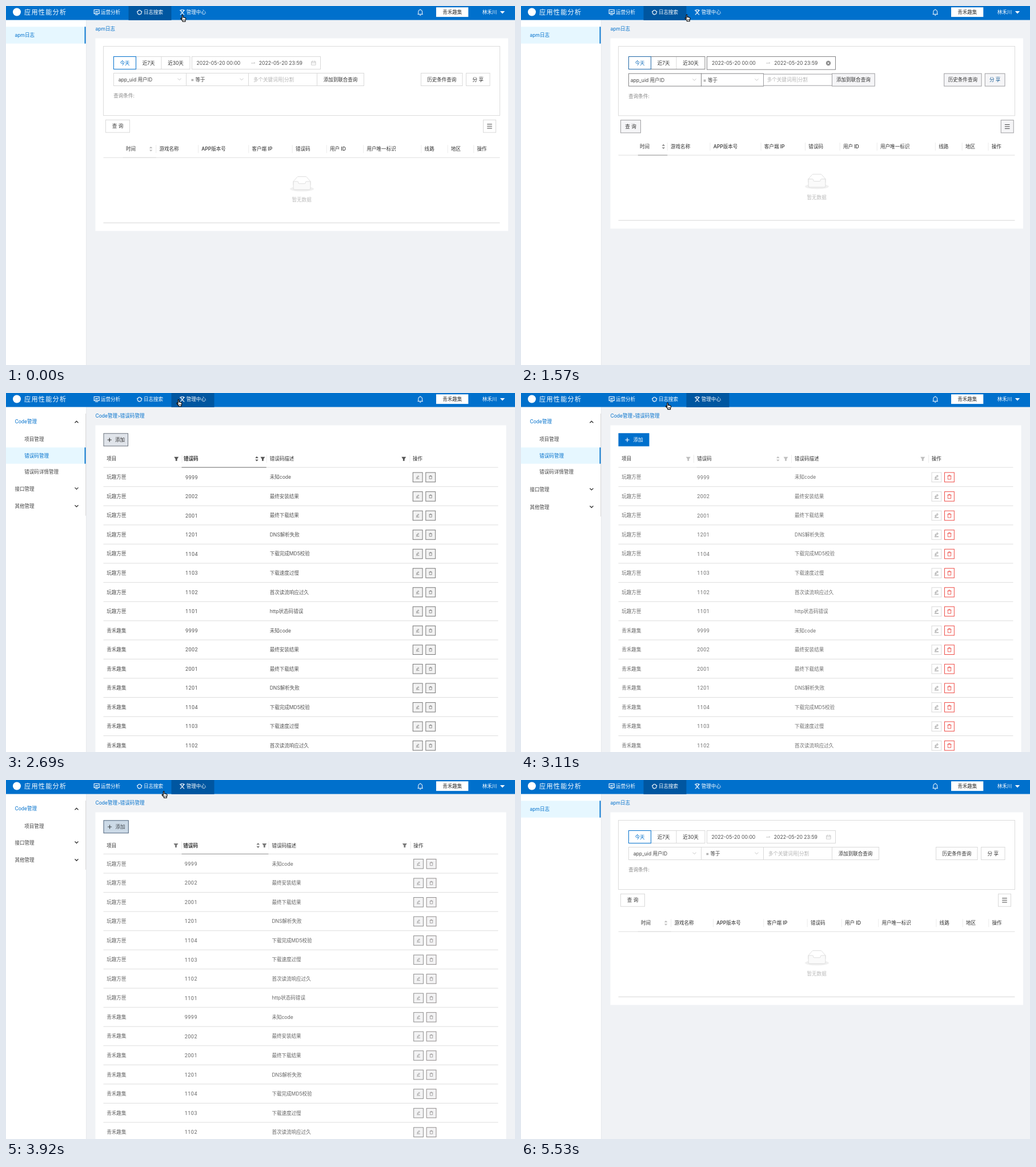
Write an HTML page with a canvas that moves like this. It is 891 px wide and 628 px high and loops after 7060 ms.

```html
<!DOCTYPE html>
<html lang="zh-CN">
<head>
<meta charset="utf-8">
<title>应用性能分析</title>
<style>
html, body { margin: 0; width: 100%; height: 100%; overflow: hidden; background: #f0f2f5; }
canvas { display: block; width: 100vw; height: 100vh; }
</style>
</head>
<body>
<canvas id="stage"></canvas>
<script>
const W = 891, H = 628, LOOP = 7060;
const BLUE = '#0070cc', INK = '#333333', GREY = '#d9d9d9', WHITE = '#ffffff';
const CJK = '"Noto Sans CJK SC", "Noto Sans CJK", sans-serif';
const canvas = document.getElementById('stage');
const ctx = canvas.getContext('2d');
const dpr = window.devicePixelRatio || 1;
canvas.width = W * dpr;
canvas.height = H * dpr;

// Page switches: [time, page]
const SWITCHES = [
  [0, 'log'], [890, 'admin'], [1420, 'log'], [1980, 'admin'], [2330, 'log'],
  [2655, 'admin'], [3460, 'log'], [3820, 'admin'], [4185, 'log']
];

// Pointer path: [time, x, y]
const PATH = [
  [0, 305, 15], [360, 305, 15], [470, 310, 15], [890, 310, 15], [1170, 247, 14],
  [1380, 249, 15], [1720, 312, 14], [2040, 315, 12], [2220, 258, 16], [2340, 256, 16],
  [2560, 306, 12], [2690, 298, 11], [2900, 250, 15], [3240, 254, 17], [3520, 313, 15],
  [3700, 314, 16], [4030, 258, 20], [4220, 264, 19], [4400, 480, 180], [4600, 685, 351],
  [4900, 775, 505], [5310, 831, 610], [5530, 836, 630]
];

const APP = '青禾趣集', BOX = '玩趣方匣', USER = '林禾川';
const ERRORS = [
  ['9999', '未知code'], ['2002', '最终安装结果'], ['2001', '最终下载结果'], ['1201', 'DNS解析失败'],
  ['1104', '下载完成MD5校验'], ['1103', '下载速度过慢'], ['1102', '首次读流响应过久'], ['1101', 'http状态码错误']
];

let age = 9999; // ms since the current page appeared

const lerp = (a, b, q) => a + (b - a) * q;
const clamp = q => Math.max(0, Math.min(1, q));
const inOut = q => q < .5 ? 4 * q ** 3 : 1 - (2 - 2 * q) ** 3 / 2;
const settle = (a, b, mix = lerp) => mix(a, b, inOut(clamp((age - 60) / 210)));

// Settling styles: hold the first, pass the second, ease to the last
function pose(a, b, c, mix = lerp) {
  return age < 60 ? mix(a, b, clamp((age - 40) / 20)) : settle(b, c, mix);
}

function mixColor(a, b, q) {
  const part = (s, i) => parseInt(s.slice(i, i + 2), 16);
  return `rgb(${[1, 3, 5].map(i => Math.round(lerp(part(a, i), part(b, i), q)))})`;
}
const tone = (a, b, c) => pose(a, b, c, mixColor);

function text(s, x, y, color = INK, { size = 8.54, weight = 400, align = 'left', gap = 0, latin = 'Inter' } = {}) {
  ctx.font = `${weight} ${size}px ${latin}, ${CJK}`;
  ctx.letterSpacing = gap + 'px';
  ctx.textAlign = align;
  ctx.fillStyle = color;
  ctx.fillText(s, x, y + size * .37);
}

function fill(x, y, w, h, color) {
  ctx.fillStyle = color;
  ctx.fillRect(x, y, w, h);
}

function frame(x0, y0, x1, y1, border, back) {
  if (back) fill(x0, y0, x1 - x0, y1 - y0, back);
  ctx.strokeStyle = border;
  ctx.lineWidth = 1;
  ctx.strokeRect(x0, y0, x1 - x0, y1 - y0);
}

function shape(d, x, y, { stroke, fill: back, width = 1, scale = 1 }) {
  ctx.save();
  ctx.translate(x, y);
  ctx.scale(scale, scale);
  const p = new Path2D(d);
  if (back) { ctx.fillStyle = back; ctx.fill(p); }
  if (stroke) { ctx.strokeStyle = stroke; ctx.lineWidth = width; ctx.stroke(p); }
  ctx.restore();
}

function disc(x, y, r, color) {
  ctx.fillStyle = color;
  ctx.beginPath();
  ctx.arc(x, y, r, 0, 7);
  ctx.fill();
}

const chevron = (x, y, up, color, width = 1.3) =>
  shape(up ? 'M-3 1.7L0-1.3L3 1.7' : 'M-3-1.7L0 1.3L3-1.7', x, y, { stroke: color, width });

function sorter(x, y, color) {
  shape('M-2.8-1.2L0-4.4L2.8-1.2ZM-2.8 1.2L0 4.4L2.8 1.2Z', x, y, { fill: color });
}

function funnel(x, y, color) {
  shape('M-4-3.5H4L1.4 .3V3.6H-1.4V.3Z', x, y, { fill: color });
}

function header(page) {
  fill(0, 0, W, 24.5, BLUE);
  fill(page === 'log' ? 214.5 : 289.5, 0, 75, 24.8, '#0056a0');
  disc(19, 10.5, 7, WHITE);
  text('应用性能分析', 32, 10.5, WHITE, { size: 11.2, weight: 500, gap: 1.2 });

  const line = { stroke: WHITE, width: 1.1 };
  shape('M-4.5-4.2H4.5V2.7H-4.5ZM-2.5 4.6H2.5M-2.7 .7L-.8-1.4L.6 .2L2.8-2.2', 158.7, 10.7, line);
  text('运营分析', 166, 11, WHITE);
  shape('M-3.4-1.4A3.7 3.7 0 0 1 3.4-1.4M3.6 1A3.7 3.7 0 0 1 1 3.6M-1 3.6A3.7 3.7 0 0 1-3.6 1', 233.7, 11, line);
  shape('M-5-1.6L-1.8-1.2L-3.8 .9ZM5-1.6L1.8-1.2L3.8 .9ZM-1.2 2.4L1.4 3.8L-1 5Z', 233.7, 11, { fill: WHITE });
  text('日志搜索', 241, 11, WHITE);
  shape('M-2-4H2V-.5H-2ZM0-.5V1.5M-3.6 4.5L0 1L3.6 4.5M-4.5-3.2H-2M2-3.2H4.5', 308.5, 10.8, line);
  text('管理中心', 315.8, 11, WHITE);

  shape('M-4.6 3.4H4.6M-3.4 3.4V-1A3.4 3.4 0 0 1 3.4-1V3.4M0-4.4V-5.6M-1.3 5.2H1.3', 725.2, 11, { stroke: WHITE, width: 1 });
  fill(753, 2.3, 56.3, 16.8, WHITE);
  text(APP, 781.2, 10.8, INK, { align: 'center' });
  text(USER, 833.7, 10.8, WHITE);
  shape('M-4.2-2.2H4.2L0 2.2Z', 869, 11.2, { fill: WHITE });
}

function activeItem(y0, y1) {
  fill(0, y0, 139.5, y1 - y0, '#e6f7ff');
  fill(137.6, y0, 1.9, y1 - y0, BLUE);
}

function emptyState(dy) {
  const x = 497.2, y = 298.5 + dy, scale = .65;
  shape('M0 33A32 7 0 1 0 64 33A32 7 0 1 0 0 33Z', x, y, { fill: '#f0f0f0', scale });
  shape('M55 12.8L44.9 1.3Q44 0 42.9 0H21.1Q20 0 19.1 1.3L9 12.8V22H55Z', x, y,
    { fill: WHITE, stroke: GREY, width: 1.3, scale });
  shape('M41.6 15.9Q41.8 13 43.8 13H55V31Q55 35 52 35H12Q9 35 9 31V13H20.2Q22.4 13 22.4 16Q22.4 18.9 24.6 18.9H39.4Q41.6 18.9 41.6 15.9Z',
    x, y, { fill: '#fafafa', stroke: GREY, width: 1.3, scale });
  text('暂无数据', 517.6, 339 + dy, '#bbbbbb', { align: 'center' });
}

function logFilters(border, edge, back) {
  const drop = pose(1.5, 1, 0), top = 117.5 + drop, low = 139.5 + drop, mid = 128.4 + drop;
  frame(170.5, 70.5, 864.5, 191.5 + drop / 2, '#dcdcdc', WHITE);

  frame(188.5, 88.5, 322, 110.5, border, WHITE);
  fill(271.5, 89, 1, 21, GREY);
  frame(188.5, 88.5, 227.5, 110.5, tone('#444444', '#2f6293', BLUE));
  text('今天', 208, 99.7, tone('#444444', '#2472b5', BLUE), { align: 'center' });
  text('近7天', 249.6, 99.7, INK, { align: 'center' });
  text('近30天', 297, 99.7, INK, { align: 'center' });

  const shift = pose(1, .7, 0), dates = { size: 8.65 };
  frame(325.5, 88.5, 550.5, 110.5 + drop, border, WHITE);
  text('2022-05-20 00:00', 333.5 + shift, 99.8 + drop * .3, '#505050', dates);
  text('2022-05-20 23:59', 442.8 + shift, 99.8 + drop * .3, '#505050', dates);
  shape('M-3.5 0H3.5L1.5-1.6', 432.5, 100, { stroke: '#bfbfbf', width: .9 });
  if (age < 180) {
    disc(538, 100, 4.2, tone('#444444', '#777777', '#bbbbbb'));
    shape('M-1.5-1.5L1.5 1.5M1.5-1.5L-1.5 1.5', 538, 100, { stroke: WHITE, width: 1 });
  } else {
    shape('M-3.7-2.8H3.7V3.4H-3.7ZM-3.7-.4H3.7M-1.8-4V-1.8M1.8-4V-1.8', 538.3, 99.8, { stroke: '#bfbfbf', width: .8 });
  }

  frame(188.5, top, 315.5, low, border, WHITE);
  frame(315.5, top, 424.5, low, border, WHITE);
  const field = age < 50 ? 'a' : age < 150 ? 'app_uid⋯' : 'app_uid 用户ID';
  text(field, pose(189, 189.3, 196.7), mid + .3, '#444444');
  text(age < 50 ? '=' : '= 等于', pose(316.3, 316.6, 323.5), mid + .3, '#444444');
  chevron(303.5, mid, false, '#bfbfbf', .9);
  chevron(412.5, mid, false, '#bfbfbf', .9);
  const inset = pose(2, 1.5, 0);
  frame(424.5, top + inset, 544.5, low - inset, edge, WHITE);
  text('多个关键词用|分割', pose(428, 429.7, 433), mid, '#b5b5b5');

  const button = (s, x0, x1, color = INK) => {
    frame(x0, top, x1, low, edge, back);
    text(s, (x0 + x1) / 2, mid, color, { align: 'center' });
  };
  button('添加到联合查询', 544.5, pose(615, 615.7, 626.5));
  button('历史条件查询', pose(748.5, 747.5, 726.5), pose(810.5, 809.5, 799));
  button('分 享', pose(816.5, 815.5, 805.5), 847, tone('#1174c7', '#1174c7', INK));
  text('查询条件:', 188.3, 157 + drop * .8, '#888888');
}

function logTable(edge, back) {
  const step = pose(1, 1, 0), dy = pose(-5.6, -6.3, 0);
  const y0 = 199.3 + step * .5, y1 = 221.2 + step;
  const right = pose(205.5, 206, 216.5);
  frame(174.5, y0, right, y1, edge, back);
  text('查 询', (174.5 + right) / 2, 210 + step, INK, { align: 'center' });

  const x = pose(842.5, 842.5, 835.5);
  frame(x, y0, x + 22, y1, edge, back);
  shape('M-4.3-3.5H4.3M-4.3 0H4.3M-4.3 3.5H4.3', x + 11, 210.3 + step, { stroke: '#444444', width: 1 });

  const y = 250.2 + dy;
  const heads = ['时间', '游戏名称', 'APP版本号', '客户端 IP', '错误码', '用户 ID', '用户唯一标识', '线路', '地区', '操作'];
  const from = [205.3, 254, 329.8, 420, 498.8, 560, 626, 729.3, 776.5, 823];
  const to = [210, 268.5, 342.3, 430.5, 507, 567, 631.5, 732.6, 779, 824.5];
  const cols = to.map((c, i) => pose(from[i], lerp(from[i], c, .34), c));
  heads.forEach((s, i) => {
    text(s, cols[i], y, INK, { weight: 500 });
    if (i) fill(cols[i] - 6.3, y - 7, 1, 14, '#ebebeb');
  });
  sorter(pose(243.3, 247.3, 253.6), y, tone('#444444', '#777777', '#bfbfbf'));
  fill(170.5, y + 14.5, 694, 1, '#dedede');
  fill(204.8, y + 14.5, cols[1] - 210.5, 1, tone('#555555', '#777777', '#dedede'));
  emptyState(dy);
  fill(170.5, 378.8 + dy, 694, 1, '#d6d6d6');
}

function logPage() {
  const border = tone('#444444', '#5c5c60', GREY);
  const edge = tone('#777777', '#808084', GREY);
  const back = tone('#efefef', '#f0f0f3', WHITE);
  activeItem(36.3, 65.7);
  text('apm日志', 15.5, 51, BLUE);
  text('apm日志', 156.5, 40, BLUE);
  fill(156.5, 56.5, 722.5, 337 + pose(-5.5, -6, 0), WHITE);
  logFilters(border, edge, back);
  logTable(edge, back);
}

function adminMenu() {
  // The submenu shows whole, then folds and opens again
  const off = age < 50 ? -1.3 : settle(-61, 0);
  fill(139, 36, 1, 180 + off, '#dddddd');
  text('Code管理', 15.5, 50.3, BLUE);
  chevron(123.5, 50.5, true, INK);
  ctx.save();
  ctx.beginPath();
  ctx.rect(0, 66, 140, 87.3 + off);
  ctx.clip();
  activeItem(95.3, 123.7);
  text('项目管理', 32.3, 81.3, '#444444');
  text('错误码管理', 32.3, 109.6, BLUE);
  text('错误码详情管理', 32.3, 137.8, '#444444');
  ctx.restore();
  ['接口管理', '其他管理'].forEach((s, i) => {
    const y = 168.7 + off + i * 30.8;
    text(s, 15.5, y, '#444444');
    chevron(123.5, y - .3, false, INK);
  });
}

function rowButtons(x, y, c) {
  frame(x, y - 8.3, x + 16.8, y + 8.3, c.edit, c.back);
  shape('M-3.7 3.6H3.7M-2.6 1.5L-2.3-.2L1.4-3.6L2.9-2.2L-.8 1.2Z', x + 8.4, y, { stroke: c.pen, width: .9, scale: c.scale });
  const x2 = x + 22.5;
  frame(x2, y - 8.3, x2 + 16.8, y + 8.3, c.del, c.back);
  shape('M-3.8-2.4H3.8M-2.8-2.4V3.8H2.8V-2.4M-1.4-2.4V-4H1.4V-2.4', x2 + 8.4, y, { stroke: c.bin, width: .9, scale: c.scale });
}

function adminTable() {
  const dy = pose(0, -.7, 0), y = 115.2 + dy;
  const mark = tone('#555555', '#777777', '#bfbfbf');
  const cell = tone('#555555', '#666666', '#707070');
  const col3 = pose(461.7, 465, 479), col4 = pose(712, 713.2, 718.7);
  const code = pose(314, 313, 308.2), head = { weight: 500 };
  const digits = { latin: 'Roboto', size: 9, gap: .45 };

  text('项目', 176.3, y, INK, head);
  funnel(pose(298.2, 297.6, 292.8), y, mark);
  text('错误码', pose(311, 310.4, 308.2), y, INK, { weight: age < 150 ? 700 : 500 });
  sorter(pose(439, 441, 449.8), y, mark);
  funnel(pose(449.4, 452, 463.5), y, mark);
  text('错误码描述', col3, y, INK, head);
  funnel(pose(696.3, 697.7, 703.2), y, mark);
  text('操作', col4, y, INK, head);
  [pose(307.5, 307, 302), col3 - 6, col4 - 5.6].forEach(x => fill(x, y - 7, 1, 14, '#ebebeb'));
  fill(170.5, 129.6 + dy, 691, 1, '#dedede');
  fill(307.5, 129.6 + dy, col3 - 313.5, 1, tone('#777777', '#909090', '#dedede'));

  const c = {
    edit: tone('#777777', '#8c8c8c', GREY),
    del: tone('#777777', '#8c8c8c', '#ee4b45'),
    back: tone('#f2f2f2', '#f3f3f4', WHITE),
    pen: tone('#555555', '#777777', '#777777'),
    bin: tone('#666666', '#888888', '#ee4b45'),
    scale: pose(.72, .76, .95)
  };
  for (let i = 0; i < 15; i++) {
    const row = 147.2 + dy + i * 33.53;
    const [id, note] = ERRORS[i % 8];
    text(i < 8 ? BOX : APP, 176.3, row, cell);
    text(id, code, row, cell, digits);
    text(note, col3, row, cell);
    rowButtons(col4 + .3, row + .2, c);
    fill(170.5, row + 16, 691, 1, '#dedede');
  }
}

function adminPage() {
  adminMenu();
  text('Code管理', 156.5, 40, BLUE);
  text('>', 195.4, 40, BLUE, { size: 7 });
  text('错误码管理', 199.8, 40, BLUE);
  fill(156.5, 56.5, 719, H, WHITE);
  frame(171, 70.8, pose(213.5, 214, 224), 92.8, tone('#6b737d', '#4c6178', BLUE), tone('#e0e4ea', '#d2dde8', BLUE));
  const label = tone('#333333', '#3c4248', WHITE);
  shape('M-3.6 0H3.6M0-3.6V3.6', pose(181.2, 181.4, 186), 82, { stroke: label, width: 1.2 });
  text('添加', pose(191, 191.3, 196.5), 81.8, label);
  adminTable();
}

function pointer(t) {
  if (t >= 5530) return;
  const i = PATH.findIndex(p => p[0] > t);
  const [t0, x0, y0] = PATH[i - 1], [t1, x1, y1] = PATH[i];
  const q = (t - t0) / (t1 - t0);
  const e = t < 4220 ? q * q * (3 - 2 * q) : q;
  const x = lerp(x0, x1, e), y = lerp(y0, y1, e);
  const arrow = y > 27 || (t >= 1980 && t < 2100);
  if (arrow) {
    shape('M.5 .5V10.2L2.8 8.1L4.4 11.8L6.2 11L4.6 7.4H7.6Z', x, y, { fill: '#000000', stroke: WHITE, width: .8 });
  } else {
    shape('M3 7.6V1.6Q3 .6 3.9 .6Q4.8 .6 4.8 1.6V5L6.4 5L8 5.5L9.5 6.2Q10 6.8 9.8 8L8.9 10.2V12.3H4.2V11L1 7.6Q.4 6.4 1.4 6.3Q2.2 6.4 3 7.6Z',
      x, y, { fill: WHITE, stroke: '#000000', width: 1.1 });
    shape('M5.3 8.3V10.6M6.6 8.3V10.6M7.9 8.3V10.6', x, y, { stroke: '#000000', width: .6 });
  }
}

function draw(t) {
  const [since, page] = SWITCHES.filter(s => s[0] <= t).pop();
  age = since ? t - since : 9999;
  ctx.setTransform(dpr, 0, 0, dpr, 0, 0);
  fill(0, 0, W, H, '#f0f2f5');
  fill(0, 24.5, 140, H, WHITE);
  fill(140, 24.5, 1, H, '#e8eaed');
  if (page === 'log') logPage(); else adminPage();
  header(page);
  pointer(t);
}

const start = performance.now();
function tick() {
  draw((performance.now() - start) % LOOP);
  requestAnimationFrame(tick);
}
tick();
</script>
</body>
</html>
```
